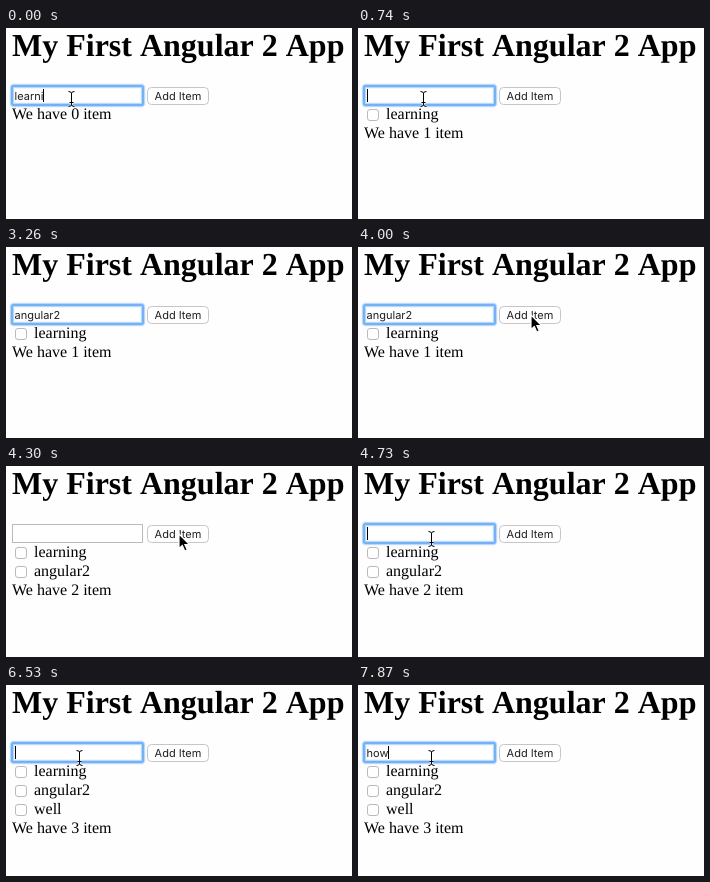
Recreate the animation shown at these times as an HTML page. Size 346 px wide and 191 px high, loop 8000 ms.

```html
<!DOCTYPE html>
<html lang="en">
<head>
<meta charset="utf-8">
<title>My First Angular 2 App</title>
<style>
  html, body { margin: 0; width: 100%; height: 100%; overflow: hidden; background: #fefefe; }
  svg { display: block; width: 100%; height: 100%; text-rendering: geometricPrecision; }
  .page { font: 16px "Liberation Serif", serif; }
  .title { font-size: 32px; font-weight: bold; font-kerning: none; }
  .ui { font: 11px Inter, sans-serif; }
  .ui text { fill-opacity: .88; }
  .box { fill: #fff; stroke: #bababa; }
  #button { stroke: #c6c6c6; }
</style>
</head>
<body>
<svg viewBox="0 0 346 191" xmlns="http://www.w3.org/2000/svg">
  <defs>
    <linearGradient id="blue" x2="0" y2="1">
      <stop stop-color="#6cb3fa"/><stop offset="1" stop-color="#0a6dff"/>
    </linearGradient>
  </defs>
  <g class="page">
    <text class="title" x="6" y="28">My First Angular 2 App</text>
    <g id="list"></g>
    <text id="count" x="6"></text>
  </g>
  <g class="ui">
    <rect class="box" x="6.5" y="58.5" width="130" height="18"/>
    <g id="ring" fill="none">
      <rect x="6" y="58" width="131" height="19" rx="2" stroke="#eff6fe" stroke-width="6"/>
      <rect x="6" y="58" width="131" height="19" rx="2" stroke="#b9d8fa" stroke-width="4"/>
      <rect x="6" y="58" width="131" height="19" rx="1.5" stroke="#74b2f4" stroke-width="2"/>
    </g>
    <text id="typed" x="8.6" y="72"></text>
    <rect id="caret" y="61" width="1" height="13"/>
    <rect id="button" class="box" x="141.5" y="59.5" width="61" height="17" rx="4"/>
    <text id="label" x="148.6" y="72">Add Item</text>
  </g>
  <g id="arrow">
    <path d="M0 0V14.5L3.3 11.4L5.8 17L8.3 15.9L5.9 10.5H10.5Z" stroke="#fff" stroke-width="1.2"/>
  </g>
  <g id="beam" fill="none">
    <path d="M-3 -7.5Q0 -7.5 0 -5.5Q0 -7.5 3 -7.5M0 -6V6M-3 7.5Q0 7.5 0 5.5Q0 7.5 3 7.5M-2 3.5H2" stroke="#fff" stroke-width="2.4" stroke-opacity=".7"/>
    <path d="M-3 -7.5Q0 -7.5 0 -5.5Q0 -7.5 3 -7.5M0 -6V6M-3 7.5Q0 7.5 0 5.5Q0 7.5 3 7.5M-2 3.5H2" stroke="#000"/>
  </g>
</svg>
<script>
const $ = id => document.getElementById(id);
const LOOP = 8000;
const ITEMS = ['learning', 'angular2', 'well'];

// Each step changes only the listed parts of the state.
const beam = (x, y) => ({ pointer: 'beam', x, y });
const arrow = (x, y) => ({ pointer: 'arrow', x, y });
const type = text => ({ text, caret: true });
const blink = { caret: false };

const steps = [
  [0, { ...type('learni'), ...beam(65.5, 71), items: 0, focus: true, pressed: false }],
  [150, type('learnin')],
  [290, type('learning')],
  [740, { ...type(''), items: 1 }],
  [1190, blink],
  [1790, type('a')],
  [1930, type('an')],
  [2080, type('ang')],
  [2220, type('angul')],
  [2370, type('angula')],
  [2670, type('angular')],
  [2820, type('angular2')],
  [3110, beam(166.5, 8)],
  [3260, { ...blink, pointer: '' }],
  [3710, beam(238.5, 18.5)],
  [3850, arrow(190, 52)],
  [4000, arrow(173, 68)],
  [4150, { ...blink, focus: false, pressed: true }],
  [4300, { text: '', items: 2, pressed: false }],
  [4440, arrow(156, 70)],
  [4590, beam(86.5, 73)],
  [4730, { ...type(''), ...beam(73.5, 73), focus: true }],
  [5180, blink],
  [5780, type('we')],
  [6080, type('wel')],
  [6230, type('well')],
  [6530, { ...type(''), items: 3 }],
  [6970, blink],
  [7570, type('h')],
  [7720, type('ho')],
  [7870, type('how')]
];

const rowY = i => 91 + 19 * i;

$('list').innerHTML = ITEMS.map((name, i) => `<g>
  <rect class="box" x="9.5" y="${rowY(i) - 9.5}" width="11" height="11" rx="2.5"/>
  <text x="28" y="${rowY(i)}">${name}</text></g>`).join('');

const show = (el, on) => el.setAttribute('visibility', on ? 'visible' : 'hidden');

function stateAt(t) {
  const s = {};
  for (const [start, change] of steps) if (start <= t) Object.assign(s, change);
  return s;
}

function render(t) {
  const s = stateAt(t);
  [...$('list').children].forEach((row, i) => show(row, i < s.items));
  $('count').textContent = `We have ${s.items} item`;
  $('count').setAttribute('y', rowY(s.items));

  $('typed').textContent = s.text;
  const width = s.text ? $('typed').getComputedTextLength() : 0;
  $('caret').setAttribute('x', 9 + Math.floor(width));
  show($('caret'), s.caret);
  show($('ring'), s.focus);

  $('button').style.fill = s.pressed ? 'url(#blue)' : '#fff';
  $('button').style.stroke = s.pressed ? '#2a7be0' : '';
  $('label').setAttribute('fill', s.pressed ? '#fff' : '#000');

  for (const id of ['arrow', 'beam']) {
    show($(id), s.pointer === id);
    $(id).setAttribute('transform', `translate(${s.x} ${s.y})`);
  }
}

function tick() {
  render(performance.now() % LOOP);
  requestAnimationFrame(tick);
}
tick();
</script>
</body>
</html>
```
